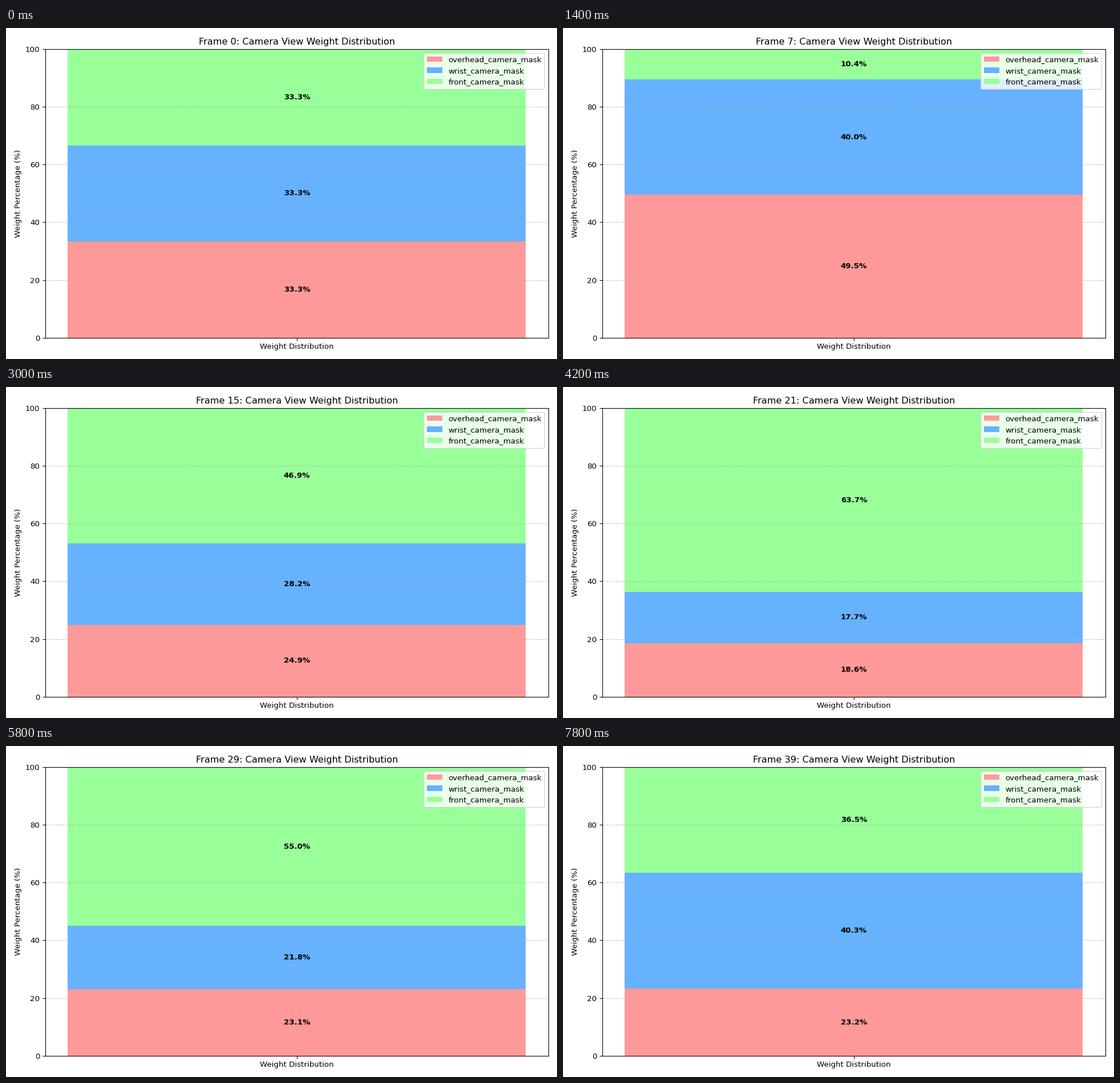
These frames come from a looping animation (966 by 580 pixels, 8000 ms). A matplotlib script:

```python
import matplotlib.pyplot as plt
import numpy as np
from matplotlib.animation import FuncAnimation

W, H = 966, 580
DPI = H / 6
FRAMES, INTERVAL = 40, 200
CAMERAS = {
    "overhead_camera_mask": "#ff9999",
    "wrist_camera_mask": "#66b2ff",
    "front_camera_mask": "#99ff99",
}

# Turning points of the two lower shares; the front camera takes the rest.
STEPS = [3, 10, 15, 21, 24, 29, 39]
OVERHEAD = [59.1, 41.5, 24.9, 18.6, 17.3, 23.14, 23.2]
WRIST = [40.9, 37.9, 28.2, 17.7, 16.5, 21.84, 40.3]


def glide(step, values):
    """Smooth cubic curve through the turning points, held before the first."""
    step = max(step, STEPS[0])
    slopes = np.gradient(values, STEPS)
    i = min(np.searchsorted(STEPS, step, side="right"), len(STEPS) - 1) - 1
    span = STEPS[i + 1] - STEPS[i]
    u = (step - STEPS[i]) / span
    ease = u * u * (3 - 2 * u)
    bend = u * (1 - u) * ((1 - u) * slopes[i] - u * slopes[i + 1]) * span
    return values[i] + (values[i + 1] - values[i]) * ease + bend


def shares(step):
    if step == 0:  # equal weights until the first measurement
        return [100 / 3] * 3
    low, mid = glide(step, OVERHEAD), glide(step, WRIST)
    return [low, mid, max(0.0, 100 - low - mid)]


# The tiny surplus keeps the pixel size from rounding down.
fig, ax = plt.subplots(figsize=((W + 1e-6) / DPI, (H + 1e-6) / DPI), dpi=DPI)
fig.subplots_adjust(left=68.6 / W, right=951.2 / W,
                    bottom=1 - 542.8 / H, top=1 - 36.9 / H)
ax.margins(x=0.0495)

bars, labels = [], []
for name, color in CAMERAS.items():
    bars.append(ax.bar(["Weight Distribution"], [100], color=color,
                       label=name)[0])
    labels.append(ax.text(0, 0, "", ha="center", va="center",
                          fontweight="bold"))

ax.set_ylim(0, 100)
ax.set_ylabel("Weight Percentage (%)")
ax.grid(axis="y", linestyle="--", alpha=0.7)
ax.legend(loc="upper right")
title = ax.set_title("")


def draw(step):
    base = 0
    for bar, label, share in zip(bars, labels, shares(step)):
        bar.set_y(base)
        bar.set_height(share)
        label.set_y(base + share / 2)
        label.set_text(f"{share:.1f}%")
        base += share
    title.set_text(f"Frame {step}: Camera View Weight Distribution")
    return [*bars, *labels, title]


anim = FuncAnimation(fig, draw, frames=FRAMES, interval=INTERVAL,
                     init_func=lambda: draw(0), repeat=True, repeat_delay=0)
plt.show()
```
